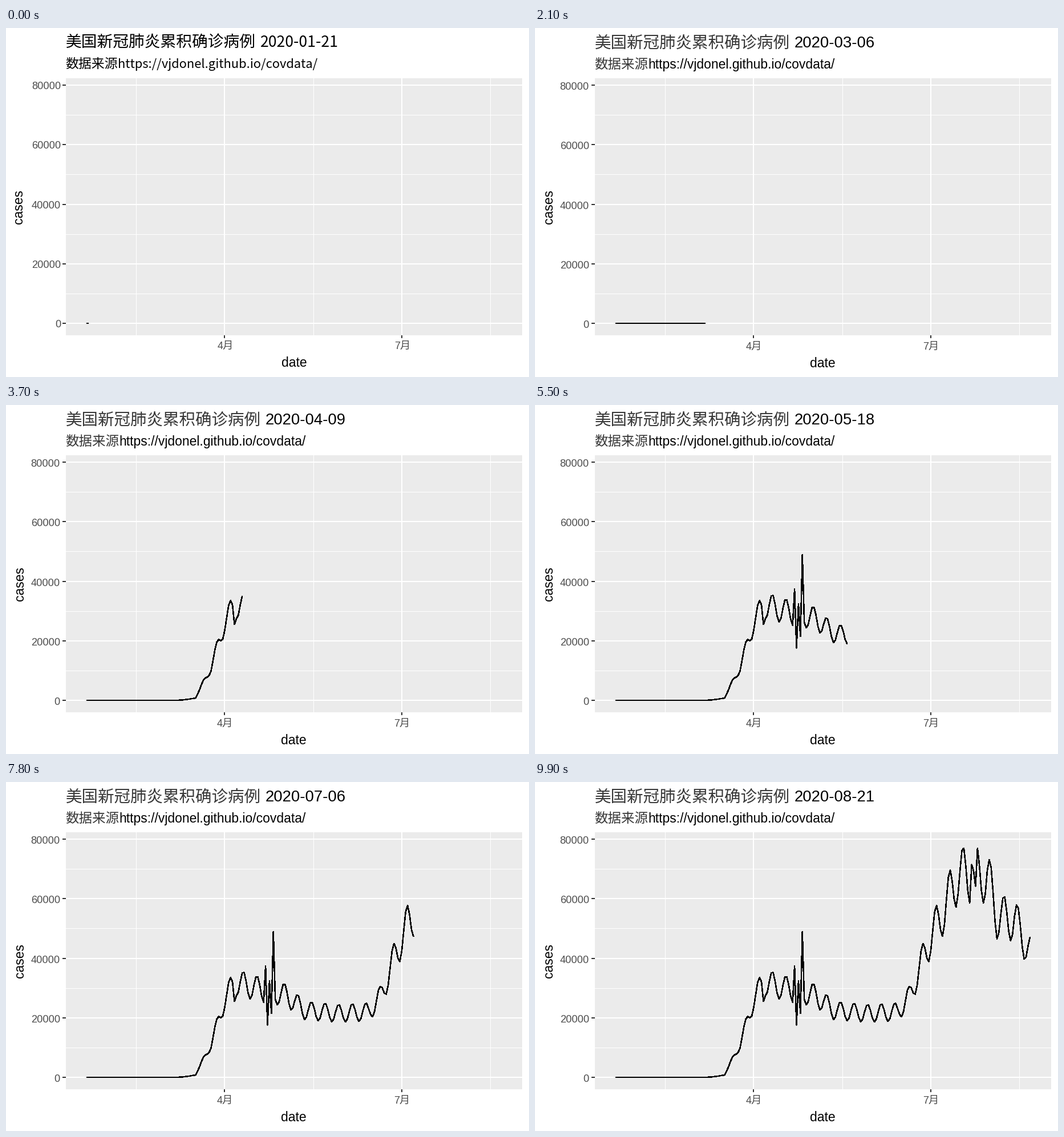
A matplotlib script that plays this animation: 917 px wide and 611 px high, repeating every 10000 ms.

```python
import numpy as np
import matplotlib.pyplot as plt
from matplotlib.animation import FuncAnimation
from matplotlib.patches import Rectangle

W, H, DPI = 917, 611, 100
PX = 72 / DPI
FRAMES, LAST_DAY, RESTYLE_AT = 100, 213, 16
START = np.datetime64("2020-01-21")
SANS, CJK = "Liberation Sans", "Noto Sans CJK JP"
LEFT, RIGHT, TOP, BOTTOM = 104.5, 905, 87.5, 537.5

# Trend as (day, thousand cases), and single days of odd reporting
TREND = [(0, 0), (46, 0), (53, 0.4), (56, 0.9), (64, 11), (71, 26), (76, 32),
         (90, 29.5), (103, 27.5), (112, 22.5), (130, 21.5), (145, 22),
         (151, 27), (162, 47), (168, 55), (176, 68), (191, 68), (196, 54),
         (205, 53), (213, 42)]
JUMPS = {76: -4, 92: 11, 93: -12, 95: -11, 96: 19, 183: 10, 185: -12}


def x_of(day):
    return 141.2 + 3.412 * day


def y_of(cases):
    return 517.2 - cases * 104.35 / 20000


def daily_cases(days):
    """Trend times a weekly reporting cycle, plus the odd days."""
    trend = np.interp(days, *zip(*TREND))
    week = 1 + 0.14 * np.cos(2 * np.pi * (days - 3.6) / 7)
    cases = trend * week
    for day, extra in JUMPS.items():
        cases[day] += extra
    return cases * 1000


days = np.arange(LAST_DAY + 1)
line_x, line_y = x_of(days), y_of(daily_cases(days))

fig = plt.figure(figsize=(W / DPI, H / DPI), dpi=DPI, facecolor="white")
ax = fig.add_axes([0, 0, 1, 1])
ax.set(xlim=(0, W), ylim=(H, 0))
ax.axis("off")


def stroke(xs, ys, color, width, z, **kw):
    return ax.plot(xs, ys, color=color, lw=width * PX, zorder=z,
                   solid_capstyle="butt", solid_joinstyle="round",
                   antialiased=False, **kw)[0]


def label(x, y, text, size, family, color="black", **kw):
    return ax.text(x, y, text, fontsize=size * PX, family=family, color=color,
                   va="baseline", **kw)


ax.add_patch(Rectangle((LEFT, TOP), RIGHT - LEFT, BOTTOM - TOP,
                       fc="#EBEBEB", ec="none", zorder=0))
x_ticks = {"4月": x_of(71), "7月": x_of(162)}
y_ticks = {str(v): y_of(v) for v in range(0, 80001, 20000)}

for day in (25.5, 116.5, 207.5):
    stroke([x_of(day)] * 2, [TOP, BOTTOM], "white", 1, 1)
for v in range(10000, 80000, 20000):
    stroke([LEFT, RIGHT], [y_of(v)] * 2, "white", 1, 1)
for x in x_ticks.values():
    stroke([x, x], [TOP, BOTTOM], "white", 2, 2)
    stroke([x, x], [BOTTOM, BOTTOM + 5.7], "#333333", 2, 2)
for y in y_ticks.values():
    stroke([LEFT, RIGHT], [y, y], "white", 2, 2)
    stroke([LEFT - 5.7, LEFT], [y, y], "#333333", 2, 2)

curve = stroke([], [], "black", 1.5, 3, snap=False)


def make_texts(latin, cjk_color, head, sub, date_at, url_at, dx, dy,
               tick_right, name_x):
    """Build one full set of labels; the date label comes first."""
    (head_cjk, head_lat), (sub_cjk, sub_lat) = head, sub
    texts = [
        label(date_at, 33.4 + dy, "", head_lat, latin),
        label(104.5, 33.2 + dy, "美国新冠肺炎累积确诊病例", head_cjk, CJK,
              cjk_color, weight="light"),
        label(104.5, 70 + dy, "数据来源", sub_cjk, CJK, cjk_color,
              weight="light"),
        label(url_at, 70 + dy, "https://vjdonel.github.io/covdata/", sub_lat,
              latin),
        label(505.5 + dx, 593 + dy, "date", 22.9, SANS, ha="center"),
        label(name_x, 313, "cases", 22.9, SANS, ha="center", rotation=90,
              rotation_mode="anchor"),
    ]
    for text, x in x_ticks.items():
        texts.append(label(x + 1 + dx, 561.5 + dy, text, 18.3, [SANS, CJK],
                           "#4D4D4D", ha="center"))
    for text, y in y_ticks.items():
        texts.append(label(tick_right, y + 7 + dy, text, 18.3, SANS,
                           "#4D4D4D", ha="right"))
    return texts


first = make_texts(CJK, "black", (27.7, 26.7), (22.9, 21.9),
                   446, 196, 0, 0, 96.2, 29.5)
second = make_texts(SANS, "#383838", (28.5, 27.5), (23.5, 22.9),
                    455, 198.5, -1, 1, 94.8, 31)


def update(i):
    day = i * LAST_DAY // (FRAMES - 1)
    curve.set_data(line_x[:day + 2], line_y[:day + 2])
    for texts, shown in ((first, i < RESTYLE_AT), (second, i >= RESTYLE_AT)):
        texts[0].set_text(str(START + day))
        for t in texts:
            t.set_visible(shown)
    return [curve, *first, *second]


anim = FuncAnimation(fig, update, frames=FRAMES, interval=100,
                     init_func=lambda: update(0), repeat=True, repeat_delay=0)
plt.show()
```
